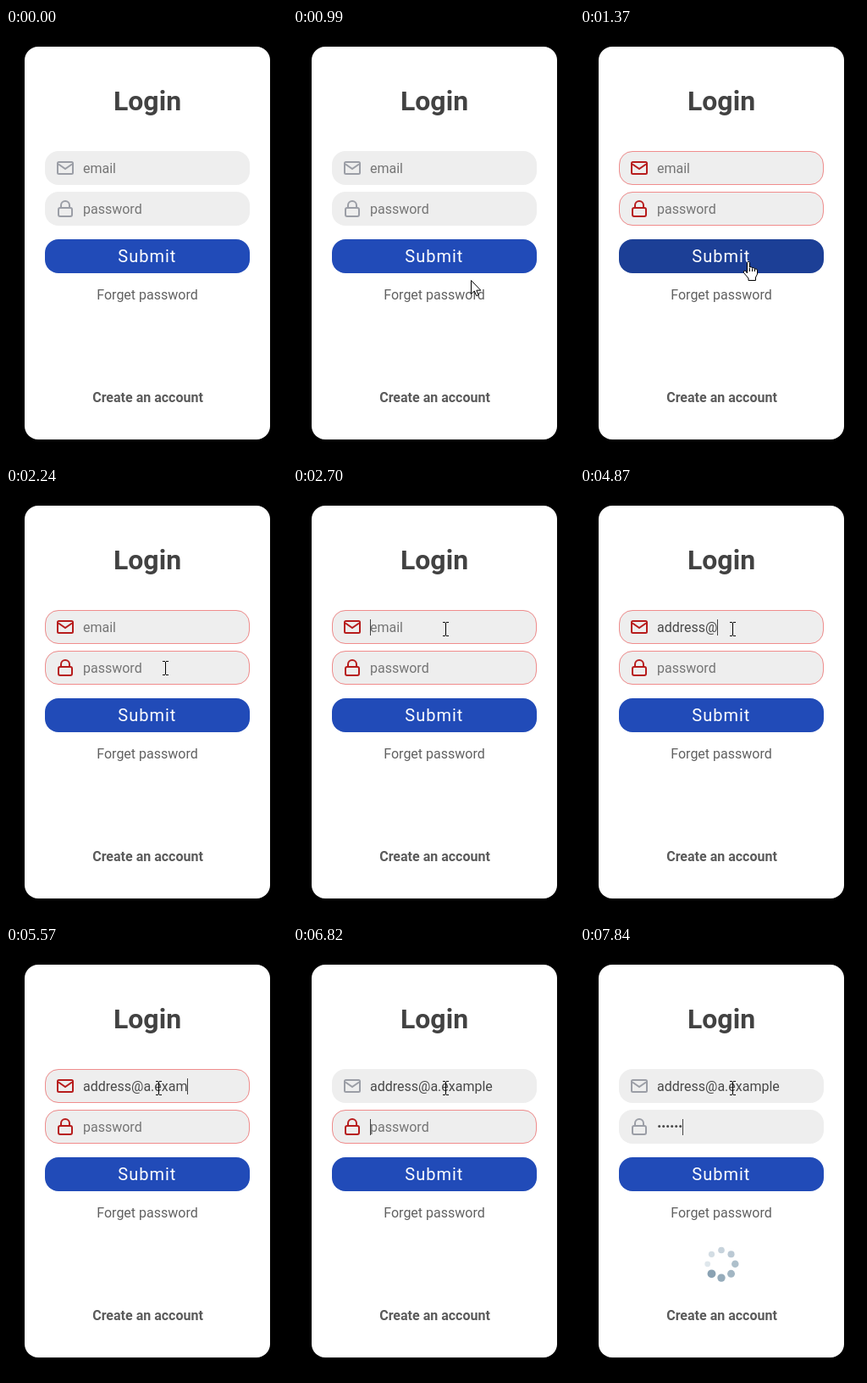
An HTML page with a canvas that plays this animation: 332 by 508 pixels, repeating every 8 s.

```html
<!DOCTYPE html>
<html lang="en">
<head>
<meta charset="utf-8">
<title>Login form</title>
<style>
  html, body { margin: 0; width: 100%; height: 100%; overflow: hidden; background: #000; }
  canvas { display: block; width: 332px; height: 508px; }
</style>
</head>
<body>
<canvas id="stage" width="332" height="508"></canvas>
<script>
const ctx = document.getElementById('stage').getContext('2d');
const LOOP = 8000, BLINK = 530;
const GREY = '#9b9ea6', RED = '#b71c1c';

const EMAIL = 'address@a.example';
const emailKeys = [3560, 3710, 4090, 4260, 4410, 4490, 4570, 4870, 5040,
                   5190, 5270, 5340, 5420, 5570, 5650, 5730, 5810];
const passKeys = [7070, 7150, 7220, 7390, 7470, 7540];
const EMAIL_FOCUS = 2630, PASS_FOCUS = 6820;
const ERROR = 1370, EMAIL_OK = 5980, PASS_OK = 7840;
const clicks = [[1220, 1370], [1920, 2070], [2620, 2700]];

const between = (t, a, b) => t >= a && t < b;
const pressed = (keys, t) => keys.filter(k => k <= t).length;

function box(x, y, w, h, r, fill, stroke) {
  ctx.beginPath();
  ctx.roundRect(x, y, w, h, r);
  if (fill) { ctx.fillStyle = fill; ctx.fill(); }
  if (stroke) { ctx.strokeStyle = stroke; ctx.stroke(); }
}

function dot(x, y, r, fill) {
  ctx.beginPath();
  ctx.arc(x, y, r, 0, Math.PI * 2);
  ctx.fillStyle = fill;
  ctx.fill();
}

function text(str, x, y, size, color, weight = 400, align = 'center', spacing = 0) {
  ctx.font = `${weight} ${size}px Roboto, sans-serif`;
  ctx.textAlign = align;
  ctx.letterSpacing = spacing + 'px';
  ctx.fillStyle = color;
  ctx.fillText(str, x, y);
  ctx.letterSpacing = '0px';
}

function polygon(points) {
  ctx.beginPath();
  points.forEach(([x, y]) => ctx.lineTo(x, y));
  ctx.closePath();
}

function outline() {
  ctx.fillStyle = '#fff';
  ctx.strokeStyle = '#000';
  ctx.lineWidth = 1;
  ctx.lineJoin = 'round';
  ctx.fill();
  ctx.stroke();
}

function mailIcon(color) {
  ctx.lineWidth = 2;
  box(61, 158, 18, 14, 1.5, null, color);
  ctx.beginPath();
  ctx.moveTo(62, 160.5);
  ctx.lineTo(70, 166);
  ctx.lineTo(78, 160.5);
  ctx.stroke();
}

function lockIcon(color) {
  ctx.lineWidth = 2;
  box(62, 212, 16, 10, 2, null, color);
  ctx.beginPath();
  ctx.moveTo(65, 212);
  ctx.arc(70, 209, 5, Math.PI, 0);
  ctx.lineTo(75, 212);
  ctx.stroke();
}

function field(y, error) {
  box(46, y, 242, 40, 16, '#eee');
  if (error) {
    ctx.lineWidth = 1;
    box(46.5, y + .5, 241, 39, 15.5, null, '#f08c8c');
  }
}

function caret(x, y, t, focus, keys) {
  const n = pressed(keys, t);
  const last = n ? keys[n - 1] : focus;
  if (Math.floor((t - last) / BLINK) % 2) return;
  ctx.fillStyle = '#444';
  ctx.fillRect(Math.round(x), y, 1, 19);
}

function spinner(x, y) {
  for (let i = 0; i < 8; i++) {
    const a = Math.PI + i * Math.PI / 4, k = i / 7;
    const rgb = [223 - 85 * k, 231 - 69 * k, 236 - 57 * k].map(Math.round);
    dot(x + 16.3 * Math.cos(a), y + 16.3 * Math.sin(a), 3.4 + 1.5 * k, `rgb(${rgb})`);
  }
}

function pointer(t) {
  const glide = (from, to, p, power) => {
    const e = 1 - Math.pow(1 - Math.min(1, p), power);
    return from.map((v, i) => Math.round(v + (to[i] - v) * e));
  };
  if (t < 2240) {
    return glide([306, 474], [198, 274], Math.floor((t - 590) / 78.75) / 7, 1.73);
  }
  return glide([188, 213], [180, 167], Math.floor((t - 2240) / 76) / 4, 2.2);
}

function arrow() {
  polygon([[.5, .5], [.5, 16.5], [4.3, 13], [6.8, 18.7], [9.2, 17.7], [6.8, 12.2], [11.8, 12.2]]);
  outline();
}

function hand() {
  ctx.beginPath();
  ctx.moveTo(-.5, 15);
  ctx.lineTo(-.5, 2.5);
  ctx.quadraticCurveTo(1, -.5, 2.5, 2.5);
  ctx.lineTo(2.5, 8);
  ctx.quadraticCurveTo(4.5, 6.5, 5.5, 9);
  ctx.quadraticCurveTo(7.5, 7.5, 8.5, 10);
  ctx.quadraticCurveTo(11.5, 9, 11.5, 12);
  ctx.lineTo(11.5, 16);
  ctx.lineTo(9.5, 20);
  ctx.lineTo(9.5, 23.5);
  ctx.lineTo(1, 23.5);
  ctx.lineTo(1, 21);
  ctx.lineTo(-4.5, 14.5);
  ctx.quadraticCurveTo(-5, 11, -2, 12.5);
  ctx.closePath();
  outline();
  ctx.beginPath();
  for (const x of [2.5, 5.5, 8.5]) {
    ctx.moveTo(x, 8.5 + x / 6);
    ctx.lineTo(x, 13);
  }
  ctx.stroke();
}

function beam() {
  ctx.fillStyle = '#000';
  ctx.fillRect(0, -7, 1, 15);
  for (const y of [-8, 8]) {
    ctx.fillRect(-3, y, 3, 1);
    ctx.fillRect(1, y, 3, 1);
  }
}

function draw(t) {
  const shown = t >= 590;
  const [px, py] = pointer(t);
  const inside = y => shown && px >= 46 && px < 288 && py >= y && py < y + 40;
  const hover = inside(249);
  const badMail = between(t, ERROR, EMAIL_OK), badPass = between(t, ERROR, PASS_OK);

  ctx.fillStyle = '#000';
  ctx.fillRect(0, 0, 332, 508);
  box(22, 22, 290, 463, 16, '#fff');
  text('Login', 167, 97, 32, '#424242', 700);

  field(145, badMail);
  mailIcon(badMail ? RED : GREY);
  const typed = EMAIL.slice(0, pressed(emailKeys, t));
  text(typed || 'email', 91, 171, 16, typed ? '#484848' : '#757575', 400, 'left');
  if (between(t, EMAIL_FOCUS, PASS_FOCUS)) {
    caret(91 + (typed && ctx.measureText(typed).width), 156, t, EMAIL_FOCUS, emailKeys);
  }

  field(193, badPass);
  lockIcon(badPass ? RED : GREY);
  const dots = pressed(passKeys, t);
  if (!dots) text('password', 91, 219, 16, '#757575', 400, 'left');
  for (let i = 0; i < dots; i++) dot(93.7 + 5 * i, 212.5, 1.5, '#484848');
  if (t >= PASS_FOCUS) caret(91 + 5 * dots, 204, t, PASS_FOCUS, passKeys);

  box(46, 249, 242, 40, 16, hover ? '#1c3f96' : '#214bb8');
  text('Submit', 132.3, 276, 20, '#fff', 400, 'left', 1);
  text('Forget password', 167, 320, 16, '#616161');
  text('Create an account', 167.5, 441, 16, '#5a5a5a', 700);
  if (t >= PASS_OK) spinner(167, 374.8);

  if (!shown) return;
  if (clicks.some(([a, b]) => between(t, a, b))) {
    dot(px, py, 12, 'rgba(255, 255, 0, .47)');
  }
  ctx.save();
  ctx.translate(px, py);
  if (hover) hand();
  else if (inside(145) || inside(193)) beam();
  else arrow();
  ctx.restore();
}

const start = performance.now();
function tick() {
  draw((performance.now() - start) % LOOP);
  requestAnimationFrame(tick);
}
tick();
</script>
</body>
</html>
```
